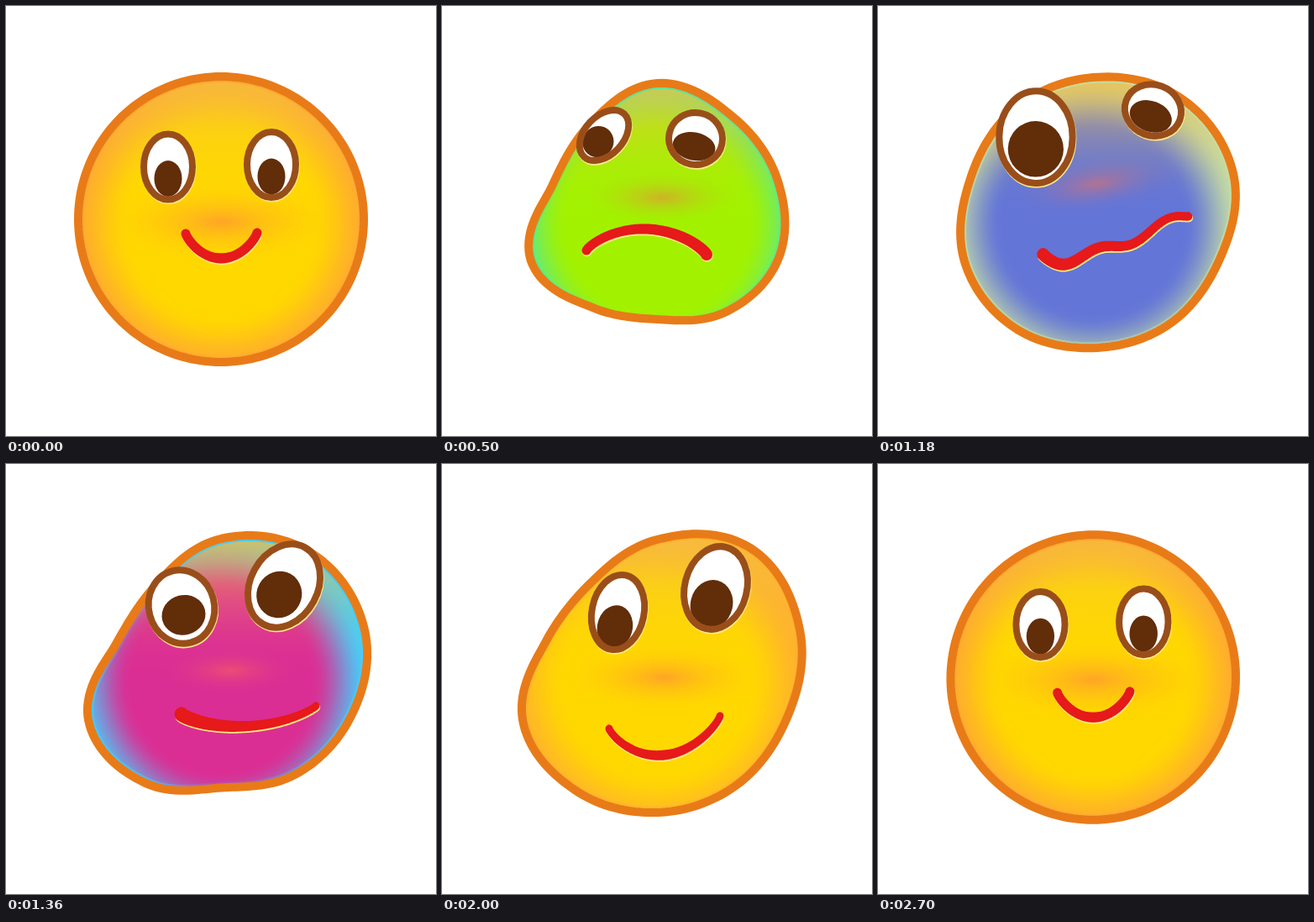
An HTML page with a canvas that plays this animation: 512 by 512 pixels, repeating every 2.72 s.

```html
<!DOCTYPE html>
<html lang="en">
<head>
<meta charset="utf-8">
<title>Morphing face</title>
<style>
  html, body { margin: 0; width: 100%; height: 100%; overflow: hidden; background: #fff; }
  canvas { display: block; width: 100vw; height: 100vh; }
</style>
</head>
<body>
<canvas id="stage" width="512" height="512"></canvas>
<script>
const ctx = document.getElementById('stage').getContext('2d');
const SIZE = 512, LOOP = 2720, STEP = 20, TAU = 2 * Math.PI;
const CENTER = { x: 256, y: 254 };

// body: radii at equal angles, clockwise from the top
// left, right: eye cx, cy, rx, ry, turn
// pupil: width, height and drop as shares of the eye
// mouth: both ends, sag, wave, width at either end
// blush: cx, cy, rx, turn
const calm = {
  body: Array(10).fill(170),
  left: [193, 191.5, 29, 39, 0],
  right: [316, 189, 29, 39, 0],
  pupil: [.57, .55, .36],
  mouth: [214, 271, 299, 270, 30, 0, 11, 11],
  fill: [255, 216, 0],
  rim: [255, 170, 48],
  blush: [257, 257, 150, 0]
};
const sick = {
  body: [162, 152, 151, 152, 137, 119, 130, 158, 131, 138],
  left: [193, 154, 23, 35, .75],
  right: [302, 158, 32, 31, .2],
  pupil: [.8, .54, .3],
  mouth: [172, 291, 315, 296, -28, 0, 11, 14],
  fill: [162, 242, 0],
  rim: [80, 233, 160],
  blush: [262, 228, 98, 0]
};
const dizzy = {
  body: [169, 170, 168, 155, 154, 154, 154, 158, 158, 167],
  left: [180, 149, 41, 55, .3],
  right: [320, 122, 31, 21, .25],
  pupil: [.81, .62, .28],
  mouth: [185, 294, 358, 245, 0, 7, 13, 11],
  fill: [60, 176, 196],
  rim: [222, 232, 130],
  blush: [258, 200, 110, -.2]
};
const flushed = {
  body: [165, 183, 180, 161, 145, 131.5, 155, 166, 131, 134],
  left: [209, 170, 39, 44, -.25],
  right: [331, 145, 40, 52, .5],
  pupil: [.67, .54, .23],
  mouth: [209, 298, 369, 288, 19, 0, 17, 9],
  fill: [219, 46, 148],
  rim: [70, 205, 250],
  blush: [267, 246, 85, 0]
};
const merry = {
  body: [163, 198, 181, 164, 146, 137, 164, 169, 122, 121],
  left: [219, 175, 32, 39, .2],
  right: [331, 133.5, 36.5, 49, .25],
  pupil: [.8, .6, .35],
  mouth: [195, 309, 366, 292, 32, 0, 16, 8],
  fill: [253, 199, 15],
  rim: [234, 184, 80],
  blush: [267, 255, 105, 0]
};
const happy = {
  body: [164, 190, 179, 162, 159.5, 161, 166, 168, 139, 137],
  left: [209.5, 176.5, 31, 45, .2],
  right: [326, 147.5, 37, 50, .25],
  pupil: [.68, .58, .4],
  mouth: [199, 315, 331, 300, 39, 0, 9, 9],
  fill: [255, 216, 0],
  rim: [255, 178, 45],
  blush: [265, 254, 125, 0]
};

const lerp = (a, b, k) => a + (b - a) * k;

function mix(a, b, k) {
  const out = {};
  for (const part in a) out[part] = a[part].map((v, i) => lerp(v, b[part][i], k));
  return out;
}

// A factor above 1 carries a movement on to its turning point.
const green = mix(calm, sick, 1.08);
const keys = [
  [0, calm],
  [540, green],
  [1080, mix(green, dizzy, 540 / 420)],
  [1360, flushed],
  [1560, mix(flushed, merry, 200 / 180)],
  [2000, happy],
  [LOOP, calm]
];

function poseAt(t) {
  const i = keys.findIndex(key => key[0] > t);
  const [t0, a] = keys[i - 1], [t1, b] = keys[i];
  return mix(a, b, (t - t0) / (t1 - t0));
}

const rgb = (c, alpha = 1) =>
  `rgba(${c.map(v => Math.max(0, Math.min(255, Math.round(v)))).join()},${alpha})`;

// Fades a colour between two strengths along a gradient.
function fade(gradient, color, from, to, ease) {
  for (let i = 0; i <= 8; i++) gradient.addColorStop(i / 8, rgb(color, lerp(from, to, ease(i / 8))));
  return gradient;
}
const smooth = u => u * u * (3 - 2 * u);
const easeOut = u => 1 - (1 - u) ** 2;

function radiusAt(radii, turn) {
  const n = radii.length, s = turn * n, i = Math.floor(s), f = s - i;
  const [a, b, c, d] = [-1, 0, 1, 2].map(k => radii[(i + k + n) % n]);
  return b + f / 2 * (c - a + f * (2 * a - 5 * b + 4 * c - d + f * (3 * (b - c) + d - a)));
}

function bodyPath(radii) {
  const path = new Path2D();
  for (let i = 0; i < 180; i++) {
    const turn = i / 180, r = radiusAt(radii, turn);
    path.lineTo(CENTER.x + r * Math.sin(turn * TAU), CENTER.y - r * Math.cos(turn * TAU));
  }
  path.closePath();
  return path;
}

function fillStage(style) {
  ctx.fillStyle = style;
  ctx.fillRect(0, 0, SIZE, SIZE);
}

function drawBody({ body, fill, rim, blush }) {
  const shape = bodyPath(body);
  const top = CENTER.y - Math.max(...body.map((r, i) => r * Math.cos(i / body.length * TAU)));
  ctx.save();
  ctx.clip(shape);
  fillStage(rgb(fill));

  const glow = fade(ctx.createRadialGradient(256, 259, 108, 256, 259, 176), rim, 0, 1, smooth);
  fillStage(glow);
  fillStage(fade(ctx.createLinearGradient(0, top, 0, top + 160), [244, 190, 65], .78, 0, easeOut));
  ctx.strokeStyle = glow;
  ctx.lineWidth = 14;
  ctx.stroke(shape);

  const [cx, cy, rx, turn] = blush;
  ctx.translate(cx, cy);
  ctx.rotate(turn);
  ctx.scale(rx, rx / 3);
  ctx.fillStyle = fade(ctx.createRadialGradient(0, 0, 0, 0, 0, 1), [255, 110, 80], .48, 0, easeOut);
  ctx.fillRect(-1, -1, 2, 2);
  ctx.restore();

  ctx.strokeStyle = '#e87b18';
  ctx.lineWidth = 10;
  ctx.stroke(shape);
}

function oval(x, y, rx, ry) {
  const path = new Path2D();
  path.ellipse(x, y, rx, ry, 0, 0, TAU);
  return path;
}

function drawEye([cx, cy, rx, ry, turn], [wide, tall, drop]) {
  const shape = oval(0, 0, rx, ry);
  const place = (dx, dy) => {
    ctx.save();
    ctx.translate(cx + dx, cy + dy);
    ctx.rotate(turn);
  };
  ctx.lineWidth = 8;
  place(.7, 1.6);
  ctx.strokeStyle = '#ffeb8a';
  ctx.stroke(shape);
  ctx.restore();

  place(0, 0);
  ctx.fillStyle = '#fff';
  ctx.fill(shape);
  ctx.strokeStyle = '#994e1a';
  ctx.save();
  ctx.clip(shape);
  ctx.fillStyle = '#622d09';
  ctx.fill(oval(0, ry * drop, rx * wide, ry * tall));
  ctx.restore();
  ctx.stroke(shape);
  ctx.restore();
}

function drawMouth([x0, y0, x1, y1, sag, wave, start, end]) {
  const path = new Path2D(), dots = 200;
  for (let i = 0; i <= dots; i++) {
    const u = smooth(i / dots);
    const x = lerp(x0, x1, u);
    const y = lerp(y0, y1, u) + sag * (4 * u * (1 - u)) ** .8
      + wave * (Math.sin(u * TAU) + 1.2 * Math.sin(2 * u * TAU));
    const r = lerp(u < .5 ? start : end, 12, 1 - Math.abs(2 * u - 1)) / 2;
    path.moveTo(x + r, y);
    path.arc(x, y, r, 0, TAU);
  }
  ctx.save();
  ctx.translate(.7, 1.8);
  ctx.fillStyle = '#ffec80';
  ctx.fill(path);
  ctx.restore();
  ctx.fillStyle = '#e6191b';
  ctx.fill(path);
}

function draw(now) {
  const pose = poseAt(Math.floor((now % LOOP) / STEP) * STEP);
  fillStage('#fff');
  drawBody(pose);
  drawEye(pose.left, pose.pupil);
  drawEye(pose.right, pose.pupil);
  drawMouth(pose.mouth);
}

let begin;
function tick(now) {
  begin ??= now;
  draw(Math.max(0, now - begin));
  requestAnimationFrame(tick);
}
draw(0);
requestAnimationFrame(tick);
</script>
</body>
</html>
```
